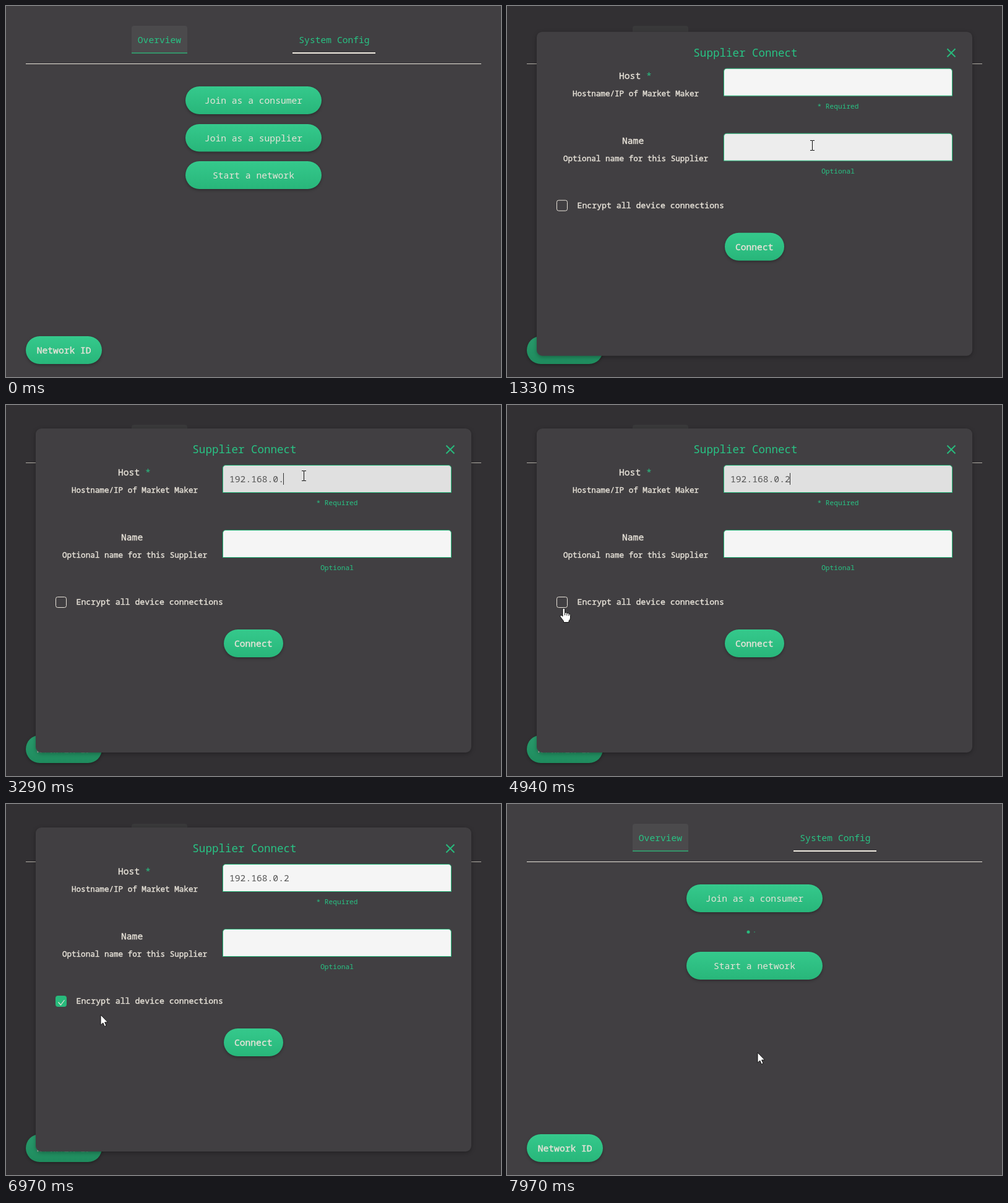
Recreate the animation shown at these times as an HTML page. Size 800x600 px, loop 8000 ms.

```html
<!DOCTYPE html>
<html lang="en">
<head>
<meta charset="utf-8">
<title>Supplier Connect</title>
<style>
  html, body { margin: 0; width: 100%; height: 100%; overflow: hidden; background: #413f42; }
  svg { display: block; width: 800px; height: 600px; }
  text { font: 14.67px "Noto Sans Mono", "DejaVu Sans Mono", monospace; fill: #e8e3d9; white-space: pre; }
  /* a thin outline gives a weight between regular and bold */
  .medium { stroke: #e8e3d9; stroke-width: .4; }
  .mid { text-anchor: middle; }
  .green { fill: #28c384; }
  .title { font-size: 17.55px; }
  .sub { font-size: 12.6px; }
  .label { font-size: 13.2px; }
  .hint { font-size: 11.2px; }
  .typed { fill: #555; }
  .button rect { fill: url(#shade); filter: drop-shadow(0 2px 2px rgba(0, 0, 0, .3)); }
  .field { stroke: #28ba7c; }
</style>
</head>
<body>
<svg viewBox="0 0 800 600">
  <defs>
    <linearGradient id="shade" x2="0" y2="1">
      <stop stop-color="#35c98c"/><stop offset="1" stop-color="#28b67a"/>
    </linearGradient>
  </defs>
  <rect width="800" height="600" fill="#413f42"/>

  <path d="M203 77V36q0-4 4-4h82q4 0 4 4V77z" fill="#4b4a4c"/>
  <path d="M203 76h90" stroke="#35946a" stroke-width="2"/>
  <text class="mid green" x="248" y="60">Overview</text>
  <path d="M463 76h134" stroke="#f0ebe1" stroke-width="2"/>
  <text class="mid green" x="530.5" y="60">System Config</text>
  <path d="M32 93.5h736" stroke="#e8e3d9"/>

  <g class="button">
    <rect x="290" y="130" width="220" height="45" rx="22.5"/>
    <text class="mid" x="400" y="158">Join as a consumer</text>
  </g>
  <rect id="ring" fill="none" stroke="#28ba7c"/>
  <g class="button" id="supplier">
    <rect x="290" y="191" width="220" height="44.5" rx="22.2"/>
    <text class="mid" x="400" y="219">Join as a supplier</text>
  </g>
  <g id="loader" fill="#28ba7c">
    <circle cx="390" cy="207"/><circle cx="400" cy="207"/><circle cx="410" cy="207"/>
  </g>
  <g class="button" id="network">
    <rect x="290" y="251" width="220" height="45" rx="22.5"/>
    <text class="mid" x="400" y="279">Start a network</text>
  </g>
  <g class="button">
    <rect x="32" y="534" width="123" height="45" rx="22.5"/>
    <text class="mid medium" x="93.7" y="562">Network ID</text>
  </g>

  <rect id="backdrop" width="800" height="600" fill="#000"/>
  <g id="modal">
    <rect x="48" y="38" width="704" height="524" rx="9" fill="#413f42"
      style="filter: drop-shadow(0 2px 3px rgba(0, 0, 0, .3))"/>
    <text class="mid green title" x="385.5" y="78">Supplier Connect</text>
    <path d="M711.5 65.5l13 13m0-13l-13 13" stroke="#28ba7c" stroke-width="2"/>

    <text class="medium" x="181" y="114">Host <tspan class="green" stroke="none">*</tspan></text>
    <text class="mid sub medium" x="208" y="142">Hostname/IP of Market Maker</text>
    <path class="field" id="host" d="M350.5 141.5V102.5q0-5 5-5h359q5 0 5 5V141.5z"/>
    <text class="typed" id="typed" x="361" y="125"></text>
    <rect id="caret" y="110" width="1" height="19" fill="#333"/>
    <text class="mid green hint" x="535" y="162">* Required</text>

    <text class="medium" x="186" y="219">Name</text>
    <text class="mid sub medium" x="208" y="247">Optional name for this Supplier</text>
    <path class="field" id="name" d="M350.5 246.5V207.5q0-5 5-5h359q5 0 5 5V246.5z"/>
    <text class="mid green hint" x="535" y="267">Optional</text>

    <rect id="box" x="80.5" y="310.5" width="17" height="17" rx="3"/>
    <path id="tick" d="M84.5 320.5l4 4.5 6-8" fill="none" stroke="#e8e3d9" stroke-width="1.2"/>
    <text class="label medium" x="113.5" y="323">Encrypt all device connections</text>

    <g class="button" id="connect">
      <rect x="352" y="363" width="96" height="45" rx="22.5"/>
      <text class="mid medium" x="399.7" y="391">Connect</text>
    </g>
  </g>

  <g id="cursor">
    <path id="arrow" d="M0 0V16.5L3.8 13l2.5 5.7 2.8-1.2L6.6 12h5z" fill="#fff" stroke="#111"/>
    <path id="beam" d="M-3-7.5h3q.5 0 .5 1 0-1 .5-1h3M.5-7V8M-3 8.500h3q.5 0 .5-1 0 1 .5 1h3"
      fill="none" stroke="#111"/>
    <path id="hand" d="M-2 1.5q0-1.7 1.7-1.7T1.5 1.5V7q2.5-1 3.3.7 2.6-.8 3.3 1 2.4-.2 2.4 2V15q0 3-2.5 5v2.5H-.5V20.5L-5.5 14q-1.5-2 .2-3 1.6-.5 3.3 1.8z
      M1.5 7v4M4.8 8v3.5M8 9v3" fill="#fff" stroke="#111"/>
  </g>
</svg>
<script>
const LOOP = 8000;
const $ = id => document.getElementById(id);
const clamp = v => Math.max(0, Math.min(1, v));
const ramp = (t, from, to) => clamp((t - from) / (to - from));
const set = (id, attrs) => { for (const k in attrs) $(id).setAttribute(k, attrs[k]); };
const show = (id, on) => set(id, { visibility: on ? 'inherit' : 'hidden' });

// time, x, y of the pointer's hot spot
const PATH = [
  [400, 737, 588], [530, 650, 395], [600, 603, 340], [800, 510, 243], [1000, 493, 225],
  [1860, 493, 225], [2000, 485, 148], [2150, 481, 114],
  [3560, 481, 114], [3760, 464, 132], [3900, 400, 190], [4200, 200, 290], [4450, 98, 328], [4600, 92, 330],
  [4670, 92, 335], [4800, 88, 334], [4940, 92, 329],
  [5200, 92, 329], [5500, 85, 322], [5950, 90, 317],
  [6490, 90, 317], [6750, 113, 328], [6970, 153, 341], [7240, 285, 380],
  [7450, 365, 392], [7720, 405, 402]
];
const HOST = '192.168.0.2';
const KEYS = [2350, 2420, 2480, 2620, 2750, 3020, 3090, 3160, 3220, 3290, 3560];
const OPEN = 1270, FOCUS = 2250, CLICK = 6090, CLOSE = 7900;

function pointer(t) {
  const i = PATH.findIndex(p => p[0] > t);
  if (i < 0) return PATH[PATH.length - 1].slice(1);
  if (!i) return [900, 700];
  const [a, b] = [PATH[i - 1], PATH[i]], k = ramp(t, a[0], b[0]);
  return [a[1] + (b[1] - a[1]) * k, a[2] + (b[2] - a[2]) * k];
}

function fieldFill(id, amount) {
  const v = Math.round(245 - 21 * amount);
  set(id, { fill: `rgb(${v},${v},${v})` });
}

function drawCursor(t, open) {
  const [x, y] = pointer(t);
  const inside = (l, top, r, b) => x >= l && x <= r && y >= top && y <= b;
  const overSupplier = !open && t < OPEN && inside(290, 191, 510, 235);
  const overConnect = open && inside(352, 363, 448, 408);
  const hand = overSupplier || overConnect || open && inside(78, 305, 112, 338);
  const beam = open && (inside(350, 97, 720, 142) || inside(350, 202, 720, 247));
  set('cursor', { transform: `translate(${Math.round(x)} ${Math.round(y)})` });
  show('hand', hand);
  show('beam', beam);
  show('arrow', !hand && !beam);
  $('supplier').style.filter = overSupplier ? 'brightness(1.06)' : '';
  $('connect').style.filter = overConnect ? 'brightness(1.06)' : '';
}

function drawPage(t) {
  const joining = t >= CLOSE;
  show('supplier', !joining);
  show('loader', joining);
  set('network', { transform: `translate(0 ${joining ? -12 : 0})` });
  [...$('loader').children].forEach((dot, i) =>
    dot.setAttribute('r', 2.5 * ramp(t, CLOSE + i * 50, CLOSE + 70 + i * 50)));
  // press ripple around the button
  const press = ramp(t, 1000, 1140), grow = 8 * press;
  show('ring', press > 0 && t < OPEN);
  set('ring', {
    x: 290 - grow / 2, y: 191 - grow / 2, width: 220 + grow, height: 44.5 + grow,
    rx: 22 + grow / 2, 'stroke-width': grow, 'stroke-opacity': .3 * (1 - press * .7)
  });
}

function drawModal(t) {
  const rest = Math.pow(1 - ramp(t, 1230, 1460), 4.5);
  const fade = t < CLOSE ? clamp((1 - rest) * 1.2) : .5 * (1 - ramp(t, CLOSE, 7960));
  const alpha = t < OPEN ? 0 : fade;
  set('backdrop', { opacity: .235 * alpha });
  set('modal', { opacity: alpha, transform: `translate(0 ${(50 * rest).toFixed(2)})` });
  show('modal', alpha > 0);

  const count = KEYS.filter(k => k <= t).length;
  const focused = t >= FOCUS && t < CLICK;
  const lastKey = count ? KEYS[count - 1] : FOCUS;
  $('typed').textContent = HOST.slice(0, count);
  set('caret', { x: Math.floor(360.5 + 8.8 * count) });
  show('caret', focused && (t - lastKey) % 1000 < 500);
  fieldFill('host', ramp(t, 2050, 2250) - ramp(t, CLICK, 6290));
  fieldFill('name', ramp(t, 1250, 1460) - ramp(t, 1920, 2120));

  const checked = t >= CLICK;
  set('box', { fill: checked ? '#28ba7c' : 'none', stroke: checked ? '#28ba7c' : '#e8e3d9' });
  show('tick', checked);
}

function frame(now) {
  const t = now % LOOP;
  const open = t >= OPEN && t < CLOSE;
  drawPage(t);
  drawModal(t);
  drawCursor(t, open);
  requestAnimationFrame(frame);
}
frame(0);
</script>
</body>
</html>
```
